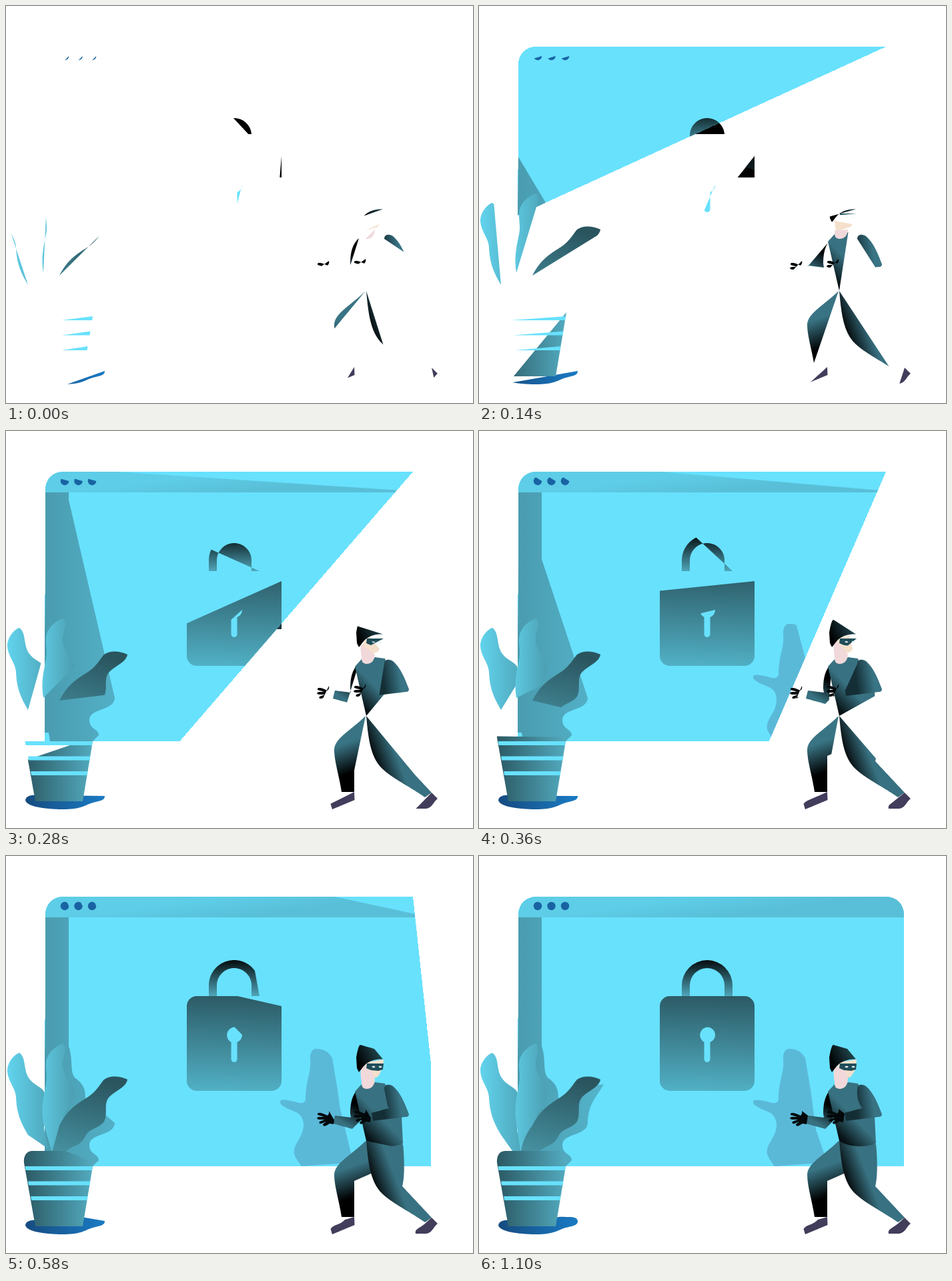
An HTML page for the animation above (1600 ms loop, 700 px wide and 595 px high).

```html
<!DOCTYPE html>
<html lang="en">
<head>
<meta charset="utf-8">
<title>Padlock and burglar</title>
<style>
html, body { margin: 0; width: 100%; height: 100%; overflow: hidden; background: #fff; }
svg { display: block; width: 100%; height: 100%; }
</style>
</head>
<body>
<svg id="stage" viewBox="0 0 700 595">
  <defs id="defs">
    <clipPath id="paneClip"><path id="paneShape"/></clipPath>
    <clipPath id="veilClip"><path id="veilShape"/></clipPath>
  </defs>
  <g id="behind"></g>
  <g id="veiled" clip-path="url(#veilClip)"></g>
  <g id="screen"></g>
  <g id="inside" clip-path="url(#paneClip)"></g>
  <g id="front"></g>
</svg>
<script>
const LOOP = 1600, STEP = 20;
const CYAN = '#68e1fd', TEAL = '#387181', SHOE = '#423d5b';
const byId = id => document.getElementById(id);
const shapes = [];

function make(tag, attrs, parent) {
  const el = document.createElementNS('http://www.w3.org/2000/svg', tag);
  for (const k in attrs) el.setAttribute(k, attrs[k]);
  parent.appendChild(el);
  return el;
}

// Two-colour gradient; "cut" makes everything past the end transparent.
let gradCount = 0;
function grad(x1, y1, c1, x2, y2, c2, cut) {
  const id = 'g' + gradCount++;
  const g = make('linearGradient', { id, gradientUnits: 'userSpaceOnUse', x1, y1, x2, y2 }, byId('defs'));
  make('stop', { offset: 0, 'stop-color': c1 }, g);
  make('stop', { offset: 1, 'stop-color': c2 }, g);
  if (cut) make('stop', { offset: 1, 'stop-color': c2, 'stop-opacity': 0 }, g);
  return `url(#${id})`;
}

// A filled outline that grows from its first point, closed by a chord.
function shape(layer, d, fill, extra) {
  const el = make('path', { d, fill, ...extra }, byId(layer));
  const length = el.getTotalLength(), points = [];
  for (let s = 0; s < length; s++) points.push(el.getPointAtLength(s));
  const item = { el, d, length, points, texts: points.map(p => p.x.toFixed(2) + ' ' + p.y.toFixed(2)) };
  shapes.push(item);
  return item;
}

function trimmed(item, p) {
  if (p >= 1) return item.d;
  const s = p * item.length, i = Math.floor(s);
  const a = item.points[i], b = item.points[Math.min(i + 1, item.points.length - 1)], f = s - i;
  const tip = (a.x + (b.x - a.x) * f).toFixed(2) + ' ' + (a.y + (b.y - a.y) * f).toFixed(2);
  return 'M' + item.texts.slice(0, i + 1).join('L') + 'L' + tip + 'Z';
}

// Browser window, and a faint veil that only deepens what lies under it
const pane = shape('screen',
  'M610 61H86C70 61 59 72 59 88V190L58 300V465H637V88C637 72 626 61 610 61Z', CYAN,
  { 'shape-rendering': 'crispEdges' });
const veil = shape('screen', 'M637 335V120H59V470H637Z', 'none');

shape('inside', 'M637 92H59V88C59 72 70 61 86 61H610C626 61 637 72 637 88Z',
  grad(340, 61, '#5ecde7', 344, 92, '#59bfd8'));
shape('inside',
  'M163 400C162 420 125 415 125 433C125 448 139 446 139 456L130 465H66L64 452H58V300L59 190V92H94V285' +
  'C101 305 95 325 104 333C118 343 119 352 119 365L140 350L187 342C176 362 164 370 163 400Z',
  grad(59, 0, '#4a9cb0', 187, 0, '#54b4cb'));
for (const x of [88, 108.5, 129])
  shape('front', `M${x + 6.2} 75a6.2 6.2 0 0 1 -12.4 0a6.2 6.2 0 0 1 12.4 0Z`, '#1963a3');
shape('inside',
  'M517 445L519 460L498 461L443 465C436 455 430 448 432 440C434 428 446 420 446 402C444 380 428 385 413 373' +
  'C408 367 412 364 422 366C436 368 446 375 449 365C449 335 458 325 456 305C455 293 461 288 466 289' +
  'C475 289 484 293 489 303L497 350L505 410Z', '#5bb9d8');

// Padlock: dark parts show outside the window, blended parts inside it
const shackle = 'M380 210H368V194A26 26 0 0 0 316 194V210H304V194A38 38 0 0 1 380 194Z';
const lock = 'M413 225V337A15 15 0 0 1 398 352H286A15 15 0 0 1 271 337V225A15 15 0 0 1 286 210H398A15 15 0 0 1 413 225Z';
shape('behind', shackle, grad(0, 156, '#000', 0, 191.5, '#000', true));
shape('behind', lock, grad(0, 210, '#000', 0, 257.5, '#000', true));
shape('veiled', lock, grad(0, 222, '#081114', 0, 297.5, '#18363d', true));
shape('inside', shackle, grad(0, 156, '#050c0e', 0, 210, '#4fa6ba'));
shape('inside', lock, grad(344, 210, '#2c5a65', 340, 352, '#51b0c5'));
shape('front',
  'M354 268A12 12 0 0 1 346.5 279V304.500A4.5 4.5 0 0 1 337.5 304.500V279A12 12 0 0 1 342 256.500A12 12 0 0 1 354 268Z', CYAN);

// Plant
shape('front',
  'M33 418C21 398 16 384 15 362C14 346 2 338 2 320C3 308 13 297 20 295C30 302 26 318 33 331C40 343 52 345 57 353' +
  'C62 370 54 390 58 416L64 442H50Z',
  grad(3, 0, '#62d3ed', 62, 0, '#4fa8bc'));
shape('front',
  'M56 400C52 375 57 358 60 342C63 328 58 318 61 305C64 293 76 284 85 281C94 287 84 302 85 313C86 335 102 340 102 354' +
  'C100 372 88 382 85 395C82 415 76 430 72 442H62Z',
  grad(54, 0, '#5dc8e0', 102, 0, '#4c9eb1'));
shape('front',
  'M80 404C91 382 104 373 120 363C136 353 140 343 147 335C157 328 172 330 182 335C180 347 163 352 154 362' +
  'C146 372 153 385 147 398C140 408 126 408 120 418C114 430 108 433 100 436L90 442H63C66 426 72 414 80 404Z',
  grad(130, 332, '#2a555f', 100, 445, '#458f9f'));
shape('front',
  'M148 547C148 556 135 554 122 560C108 567 94 567 80 567C52 566 30 562 29 553C31 544 45 545 60 547' +
  'L105 546C112 541 122 540 130 541C140 541 147 541 148 547Z',
  grad(29, 0, '#164b80', 148, 0, '#1a7bc4'));
shape('front', 'M131 459L115 555H44L27 460C26 449 31 442 40 442H118C127 442 132 448 131 459Z',
  grad(27, 0, '#2b5963', 131, 0, '#53abc0'));
for (const [l, r, y] of [[28.5, 130, 465], [33, 126.500, 487.5], [37, 122.500, 510]])
  shape('front', `M${r} ${y}L${r - 1} ${y + 6}H${l + 1}L${l} ${y}Z`, CYAN);

// Burglar: legs and shoes
shape('front', 'M539 427C518 448 493 460 492 477C492 495 499 515 503 541H522V487L547 476L575 452Z',
  grad(503, 470, '#397484', 518, 512, '#000'));
shape('front',
  'M540 427C543 460 546 490 565 507C580 521 605 533 628 549L638 542L594 495C598 480 597 450 595 432Z',
  grad(542, 475, '#000', 576, 462, TEAL));
shape('front', 'M522 541L522.500 553L489 567L486.500 559C492 551 500 554 508 545Z', SHOE);
shape('front', 'M638 542L647 551C640 556 639 566 628 566H614C612 559 620 558 628 551Z', SHOE);

// Arms and torso
shape('front', 'M529 348C519 357 516 370 516 386L517 392L493 389L490 401L519 409L530 398L531 380Z',
  grad(522, 372, '#000', 505, 400, TEAL));
shape('front',
  'M540 427L523 353L533 342L545 347L553 339L568 341L576 360L593 391L595 431C580 437 555 437 540 427Z',
  grad(535, 414, '#071114', 560, 390, TEAL));
shape('front',
  'M567 349C567 342 574 341 580 345C592 355 598 372 604 387Q604 391 599 391L550 397L548 385L574 378C568 368 566 360 567 349Z',
  grad(564, 366, '#142e35', 590, 362, '#397485'));
const hand =
  'M484 382Q485 386 482 389L475 386Q466 383 467 388L477 391L469 391Q463 393 469 395L478 395L470 398' +
  'Q468 402 473 401L480 398L475 402Q475 406 480 404L485 401L491 402L493 389Z';
shape('front', hand, '#03090b');
shape('front', hand, '#03090b', { transform: 'translate(55 -3)' });

// Head
shape('front', 'M560 327L557 331L535 338L533 322L541 309L566 305L565 319Z', '#f4e0cb');
shape('front', 'M553 335C552 347 545 349 540 349C534 348 533 346 533 338C531 330 531 320 534 314L546 317L552 328Z', '#f1d8da');
shape('front', 'M565 304.500Q547 304 537 314L529 324L526 318L525 302Q528 284 531 283L552 289Z',
  grad(530, 314, '#000', 562, 298, '#21474f'));
shape('front', 'M566 311L541 311L540 318L547 321L558 322L565 320Z', '#1f4d59');
for (const x of [551, 561])
  shape('front', `M${x + 2.5} 316a2.5 1.3 0 0 1 -5 0a2.5 1.3 0 0 1 5 0Z`, '#e4eef0');

// Progress: time, share of outline drawn, speed per ms
const keys = [
  [0, .242, .001], [80, .328, .00124], [200, .49, .0013], [280, .59, .00118],
  [440, .758, .00089], [780, .953, .0003], [1100, 1, 0]
];

function progress(t) {
  const i = keys.findIndex(k => k[0] > t);
  if (i < 0) return 1;
  const [t0, p0, v0] = keys[i - 1], [t1, p1, v1] = keys[i];
  const span = t1 - t0, u = (t - t0) / span, w = 1 - u;
  return p0 * w * w * (1 + 2 * u) + v0 * span * u * w * w +
         p1 * u * u * (3 - 2 * u) - v1 * span * u * u * w;
}

let shown = -1;
function render(t) {
  const p = progress(Math.floor(t / STEP) * STEP);
  if (p === shown) return;
  shown = p;
  for (const item of shapes) item.el.setAttribute('d', trimmed(item, p));
  byId('paneShape').setAttribute('d', trimmed(pane, p));
  byId('veilShape').setAttribute('d', trimmed(veil, p));
}

const start = performance.now();
function tick() {
  render((performance.now() - start) % LOOP);
  requestAnimationFrame(tick);
}
tick();
</script>
</body>
</html>
```
